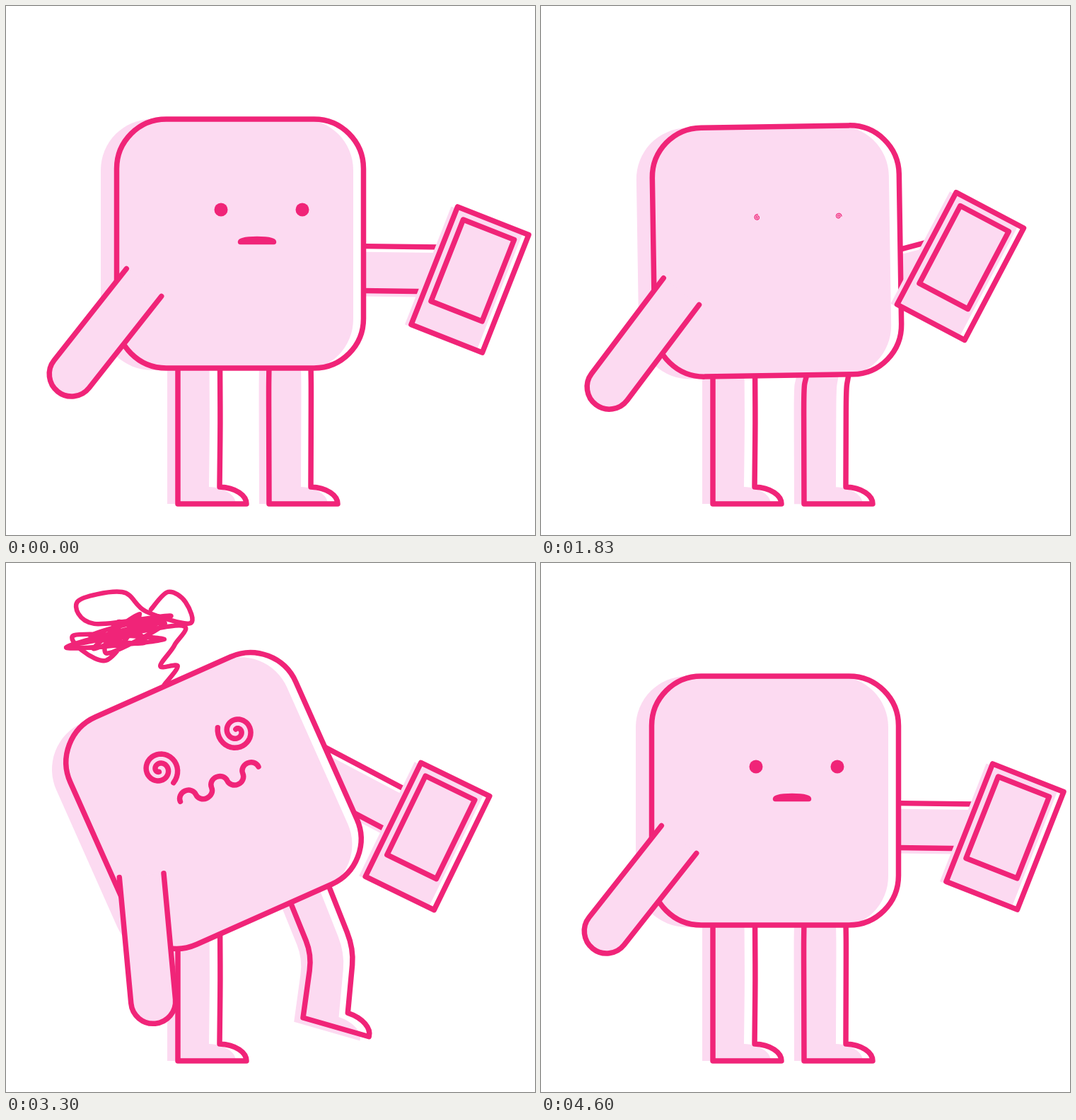
An HTML page with a canvas for the animation above (5.21 s loop, 748 by 748 pixels).

```html
<!DOCTYPE html>
<html lang="en">
<head>
<meta charset="utf-8">
<title>Dizzy block</title>
<style>
html, body { margin: 0; height: 100%; overflow: hidden; background: #fff; }
canvas { display: block; }
</style>
</head>
<body>
<canvas id="stage" width="748" height="748"></canvas>
<script>
const ctx = document.getElementById('stage').getContext('2d');
const INK = '#f02478', PINK = '#fcdaf1', LOOP = 5210, RAD = Math.PI / 180;

// body, phone: centre x, y, angle. arm: angle, length.
// leg: knee x, y, heel x, y, foot angle. face: eye radius, mouth half width, height, base line.
const rest = {
  body: [331, 336, 0], phone: [656, 387, 21.5], arm: [128.3, 165],
  leg: [401.5, 540, 372, 704, 0], face: [9.5, 23.5, 4, -2.5]
};
const lean = { ...rest, body: [364.5, 360, 13.6], phone: [596, 480, 53], arm: [142, 169], face: [13, 33, 25, 8] };
const blank = { ...rest, body: [333.5, 346.5, -0.9], phone: [593, 368, 27.8], arm: [127, 169], face: [0, 0, 0, 0] };
const reel = { ...rest, body: [288.5, 334.5, -29.5], phone: [595, 356.5, 20.9], arm: [98.7, 166], leg: [484, 488, 506, 585, -23] };
const sway = { ...rest, body: [293.5, 336, -24], phone: [596, 386.5, 26], arm: [84.7, 179], leg: [462, 550, 420, 643, 16] };
const wipe = { ...rest, body: [316, 336, -9], phone: [644, 369, 4.7], arm: [-51.3, 215], leg: [431, 545, 440, 660, -13] };
const timeline = [[0, rest], [600, lean], [1230, lean], [1830, blank], [2630, reel], [3300, sway], [3700, wipe], [4400, rest], [LOOP, rest]];
const WIPED = 3800;

function ease(t, from, to) {
  const u = Math.min(Math.max((t - from) / (to - from), 0), 1);
  return u * u * (3 - 2 * u);
}

function poseAt(t) {
  const next = timeline.findIndex(([time]) => time > t);
  const [t0, a] = timeline[next - 1], [t1, b] = timeline[next];
  const k = ease(t, t0, t1), pose = {};
  for (const part in a) pose[part] = a[part].map((v, i) => v + (b[part][i] - v) * k);
  return pose;
}

const turned = (x, y, angle) => {
  const c = Math.cos(angle * RAD), s = Math.sin(angle * RAD);
  return [x * c - y * s, x * s + y * c];
};
const add = (p, q) => [p[0] + q[0], p[1] + q[1]];
const mix = (p, q, k) => [p[0] + (q[0] - p[0]) * k, p[1] + (q[1] - p[1]) * k];
const onBody = ([x, y, angle], px, py) => add([x, y], turned(px, py, angle));

function within(x, y, angle, draw) {
  ctx.save();
  ctx.translate(x, y);
  ctx.rotate(angle * RAD);
  draw();
  ctx.restore();
}

function fill(path, dx = 0, dy = 0) {
  within(dx, dy, 0, () => ctx.fill(path));
}

function box(x, y, w, h, r = 0) {
  const path = new Path2D();
  path.roundRect(x, y, w, h, r);
  return path;
}

function leg(frontHip, backHip, [kneeX, kneeY, heelX, heelY, angle], shift) {
  const heel = [heelX, heelY];
  const onFoot = (along, up) => add(heel, turned(along, -up, angle));
  const ankle = onFoot(59, 24), hip = mix(frontHip, backHip, 0.5), foot = mix(heel, ankle, 0.5);
  const slope = Math.atan2(foot[1] - hip[1], foot[0] - hip[0]) / RAD - 90;
  const frontKnee = add([kneeX, kneeY], turned(30, 0, slope));
  const backKnee = add([kneeX, kneeY], turned(-30, 0, slope));
  const path = new Path2D();
  const bend = (from, knee, to) => {
    path.lineTo(...mix(knee, from, 0.25));
    path.quadraticCurveTo(...knee, ...mix(knee, to, 0.25));
    path.lineTo(...to);
  };
  path.moveTo(...frontHip);
  bend(frontHip, frontKnee, ankle);
  path.bezierCurveTo(...onFoot(82, 23), ...onFoot(97, 12), ...onFoot(97, 0));
  path.lineTo(...heel);
  bend(heel, backKnee, backHip);
  fill(path, ...shift);
  ctx.stroke(path);
}

// Reaches from the far side of the body to a point behind the phone.
function holdingArm({ body, phone }) {
  const [x, y] = onBody(body, 166, 35);
  const dx = phone[0] - x, dy = phone[1] - 14 - y, length = Math.hypot(dx, dy);
  const path = new Path2D(`M-30 -31.5H${length}M-30 31.5H${length}`);
  within(x - 2, y + 8, Math.atan2(dy, dx) / RAD, () => fill(box(-30, -31.5, length + 30, 63)));
  within(x, y, Math.atan2(dy, dx) / RAD, () => ctx.stroke(path));
}

function swingingArm({ body, arm: [angle, length] }) {
  const path = new Path2D(`M0 -31.5H${length}a31.5 31.5 0 0 1 0 63H0`);
  within(...onBody(body, -136, 55), angle, () => {
    fill(path);
    ctx.stroke(path);
  });
}

function phone(place) {
  within(...place, () => {
    fill(box(-54, -89.5, 108, 179), -8.5, 3);
    ctx.stroke(box(-54, -89.5, 108, 179));
    ctx.stroke(box(-40, -75.5, 77.5, 124));
  });
}

function plainFace([eye, w, h, base]) {
  ctx.fillStyle = INK;
  for (const x of [-27, 88]) {
    ctx.beginPath();
    ctx.arc(x, -48, eye, 0, 7);
    ctx.fill();
  }
  if (w > 3) ctx.stroke(new Path2D(`M${24 - w} ${base}a${w} ${h} 0 0 1 ${2 * w} 0Z`));
}

function spiral(x, y, size, end) {
  within(x, y, end, () => {
    ctx.scale(size, size);
    ctx.beginPath();
    for (let f = 0; f <= 1; f += 1 / 64) {
      ctx.lineTo(...turned(3 + 24 * f, 0, (f - 1) * 660));
    }
    ctx.stroke();
  });
}

function dizzyFace(t) {
  const k = ease(t, 1830, 2200), size = 0.16 + 0.84 * k, spin = (t - 2630) / 10;
  spiral(-27 - 25 * k, -48 - 23 * k, size, spin);
  spiral(88 - 18.5 * k, -48 - 28.5 * k, size, -78 - spin);
  if (!k) return;
  within(17, -18, 0, () => {
    ctx.scale(k, k);
    const wave = [1, 0, 1, 0, 1].map(up => `a12.1 11 0 0 ${up} 24.2 0`).join('');
    ctx.stroke(new Path2D('M-60.5 0' + wave));
  });
}

// A spring out of the head, a random tangle, then two open loops.
const spring = [[0, 0], [24, -22], [0, -27], [26, -52]];
const loops = [[-85, -105], [-92, -140], [-28, -142], [-10, -105], [55, -80], [58, -105], [27, -131], [4, -104]];
let seed = 7;
const random = () => (seed = seed * 16807 % 2147483647) / 2147483647;
const tangle = Array.from({ length: 15 }, (_, i) => {
  const a = i * 2.6 + random(), r = 0.45 + 0.55 * random();
  return [-50 + 92 * r * Math.cos(a), -82 + 32 * r * Math.sin(a)];
});

function scribble(t, tilt) {
  const size = ease(t, 1900, 2200) * (1 - ease(t, 3700, 3830));
  if (!size) return;
  const wobbly = [...tangle, ...loops].map(([x, y], i) =>
    [x + 6 * Math.sin(t / 150 + i * 2), y + 5 * Math.cos(t / 170 + i * 3)]);
  const points = [...spring, ...wobbly];
  const p = i => points[Math.min(Math.max(i, 0), points.length - 1)];
  const handle = (i, k) => [p(i)[0] + (p(i + 1)[0] - p(i - 1)[0]) * k, p(i)[1] + (p(i + 1)[1] - p(i - 1)[1]) * k];
  within(3, -178, -tilt / 2, () => {
    ctx.scale(size, size);
    ctx.lineWidth = 6.5;
    ctx.beginPath();
    ctx.moveTo(...p(0));
    for (let i = 0; i < points.length - 1; i++) {
      ctx.bezierCurveTo(...handle(i, 1 / 6), ...handle(i + 1, -1 / 6), ...p(i + 1));
    }
    ctx.stroke();
  });
}

const outline = box(-174.5, -176, 349, 352, 70), tint = box(-197, -176, 357, 355, 72);

function body(t, pose) {
  within(...pose.body, () => {
    ctx.save();
    ctx.clip(outline);
    ctx.fillStyle = '#fff';
    ctx.fill(outline);
    ctx.fillStyle = PINK;
    ctx.fill(tint);
    ctx.restore();
    scribble(t, pose.body[2]);
    ctx.stroke(outline);
    if (t >= 1830 && t < WIPED) dizzyFace(t);
    else plainFace(pose.face);
  });
  ctx.fillStyle = PINK;
}

function draw(t) {
  const pose = poseAt(t);
  ctx.fillStyle = '#fff';
  ctx.fillRect(0, 0, 748, 748);
  Object.assign(ctx, { fillStyle: PINK, strokeStyle: INK, lineWidth: 7.5, lineCap: 'round', lineJoin: 'round' });
  within(...pose.body, () => fill(tint));
  leg([302.5, 500], [243, 500], [273, 590, 243, 704, 0], [-15, 0]);
  leg(onBody(pose.body, 100, 170), onBody(pose.body, 41, 170), pose.leg, turned(-14, 0, pose.body[2]));
  holdingArm(pose);
  body(t, pose);
  phone(pose.phone);
  swingingArm(pose);
}

// Two drawings per 100 ms, held for 30 and 70 ms.
function tick() {
  const t = performance.now() % LOOP, part = t % 100;
  draw(t - part + (part >= 30 ? 30 : 0));
  requestAnimationFrame(tick);
}
tick();
</script>
</body>
</html>
```
